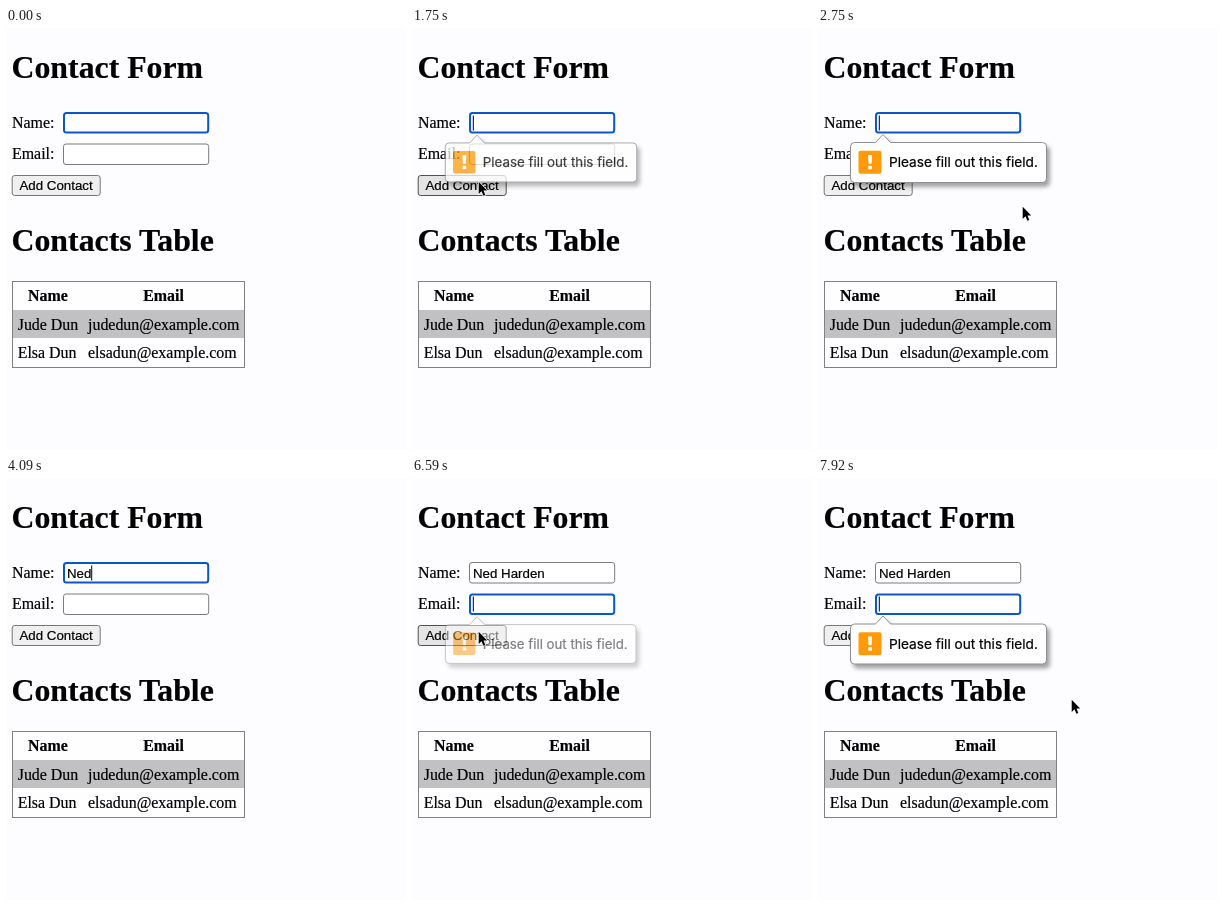
Recreate the animation shown at these times as an HTML page. Size 400 by 422 pixels, loop 8000 ms.

```html
<!DOCTYPE html>
<html lang="en">
<head>
<meta charset="utf-8">
<title>Contact Form</title>
<style>
  html, body { margin: 0; width: 100%; height: 100%; overflow: hidden; background: #fdfcff; }
  svg { display: block; }
  text { font: 15.93px "Liberation Serif", serif; white-space: pre; stroke: #000; stroke-width: .2px; }
  .h1 { font-size: 31.8px; font-weight: bold; }
  .th { font-weight: bold; text-anchor: middle; }
  .ui { font: 13.3px "Liberation Sans", sans-serif; }
  .tip { font: 13.65px Inter, sans-serif; }
  #bubble { filter: drop-shadow(3px 4px 2px rgba(0, 0, 0, .36)); }
</style>
</head>
<body>
<svg width="400" height="422" viewBox="0 0 400 422">
  <rect width="400" height="422" fill="#fdfcff"/>
  <text class="h1" x="5.5" y="50">Contact Form</text>
  <text x="6" y="99.8">Name:</text>
  <text x="6" y="131">Email:</text>
  <rect id="nameBox" rx="2.5" fill="#fff"/>
  <rect id="emailBox" rx="2.5" fill="#fff"/>
  <text id="typed" class="ui" x="61" y="99.5"></text>
  <rect id="caret" width="1" height="15"/>
  <rect id="button" x="6.2" y="147.5" width="88" height="20" rx="2.5"/>
  <text class="ui" x="13.5" y="162">Add Contact</text>

  <text class="h1" x="5.5" y="223">Contacts Table</text>
  <rect x="6.5" y="253.5" width="232" height="86" fill="#fefdff" stroke="#808080"/>
  <rect x="7" y="282" width="231" height="28" fill="#c1c0c3"/>
  <text class="th" x="42" y="273">Name</text>
  <text class="th" x="157.5" y="273">Email</text>
  <text x="11.7" y="301.5">Jude Dun</text>
  <text x="82" y="301.5">judedun@example.com</text>
  <text x="11.7" y="330">Elsa Dun</text>
  <text x="82" y="330">elsadun@example.com</text>

  <g id="bubble">
    <path d="M36.500 114.500H57.500L65 106.500L72.500 114.500H224.500a4 4 0 0 1 4 4V150.500a4 4 0 0 1-4 4H36.500a4 4 0 0 1-4-4V118.500a4 4 0 0 1 4-4Z" fill="#fff" stroke="#8e8e90"/>
    <rect x="40.500" y="122.700" width="23" height="23" rx="2" fill="#ff9a0a"/>
    <path d="M50.100 127h4l-.5 8.700h-3ZM50.300 137.800h3.600v3.400h-3.600Z" fill="#fff"/>
    <text class="tip" x="71" y="139.200">Please fill out this field.</text>
  </g>

  <path id="arrow" d="M.7 .7V12.900L3.500 10.300L5.400 14.700L7.300 13.900L5.500 9.500H9.200Z" stroke="#fff" stroke-width="1.400" paint-order="stroke"/>
  <g id="beam" fill="none">
    <path d="M-4-7.500Q0-7.500 0-5Q0-7.500 4-7.500M0-5V5M-4 7.500Q0 7.500 0 5Q0 7.500 4 7.500M-2 2.500H2" stroke="#fff" stroke-width="3"/>
    <path d="M-4-7.500Q0-7.500 0-5Q0-7.500 4-7.500M0-5V5M-4 7.500Q0 7.500 0 5Q0 7.500 4 7.500M-2 2.500H2" stroke="#111" stroke-width="1.300"/>
  </g>
</svg>
<script>
  const LOOP = 8000, RATE = 12;
  const el = id => document.getElementById(id);
  const set = (id, attrs) => { for (const k in attrs) el(id).setAttribute(k, attrs[k]); };
  const show = (id, on) => set(id, { visibility: on ? 'visible' : 'hidden' });

  const NAME = 'Ned Harden';
  const keyTicks = [45, 47, 49, 51, 54, 55, 57, 59, 60, 61];

  // pointer paths: [tick, x, y]
  const paths = [
    [[1, 285, 258], [2, 280, 250], [3, 280, 250], [4, 268, 240], [6, 193, 163], [7, 193, 163],
     [10, 118, 157], [13, 66, 153], [28, 66, 153], [30, 110, 161], [33, 204, 178], [44, 204, 178]],
    [[67, 204, 178], [69, 140, 147], [70, 116, 136], [71, 101, 134], [72, 93, 136],
     [74, 68, 153], [79, 66, 153], [81, 140, 184], [84, 253, 221], [96, 253, 221]]
  ];

  function pointerAt(n) {
    const path = paths.find(p => n >= p[0][0] && n <= p[p.length - 1][0]);
    if (!path) return null;
    const i = Math.max(1, path.findIndex(p => p[0] >= n));
    const [t0, x0, y0] = path[i - 1], [t1, x1, y1] = path[i];
    const f = (n - t0) / (t1 - t0);
    return { x: x0 + (x1 - x0) * f, y: y0 + (y1 - y0) * f };
  }

  const inside = (p, x, y, w, h) => !!p && p.x >= x && p.x <= x + w && p.y >= y && p.y <= y + h;

  function drawInput(id, y, focused, hover) {
    const d = focused ? 1 : .5;
    set(id, {
      x: 57 + d, y: y + d, width: 146.2 - 2 * d, height: 21.5 - 2 * d,
      stroke: focused ? '#0a58c6' : hover ? '#4a4a4a' : '#7b7b7b',
      'stroke-width': focused ? 2 : 1
    });
  }

  function drawBubble(n) {
    const second = n >= 78, start = second ? 78 : 19;
    const on = second || (n >= 19 && n < 47);
    show('bubble', on);
    if (!on) return;
    const age = n - start;
    const scale = 1 - .032 * Math.max(0, 1 - age / 9) ** 1.3;
    const fade = !second && n >= 45 ? (n === 45 ? .6 : .25) : 1;
    set('bubble', {
      opacity: Math.min(1, (age + 1) / 4) * fade,
      transform: `translate(65 ${second ? 165.5 : 134}) scale(${scale}) translate(-65 -134)`
    });
  }

  function draw(ms) {
    const n = Math.floor(ms * RATE / 1000 + 1e-6);
    const p = pointerAt(n);
    const pressed = (n >= 16 && n < 19) || (n >= 75 && n < 78);
    const inEmail = n >= 78, inName = !inEmail && !pressed;
    const overEmail = inside(p, 57, 116, 146, 21);
    const overName = inside(p, 57, 84, 146, 21);
    const overButton = inside(p, 6, 147, 89, 21);

    drawInput('nameBox', 84, inName, overName);
    drawInput('emailBox', 115.5, inEmail, overEmail);
    set('button', {
      fill: pressed ? '#f5f5f5' : overButton ? '#e4e4e5' : '#efeff0',
      stroke: pressed ? '#8d8d8d' : overButton ? '#4f4f4f' : '#767676'
    });

    const typed = NAME.slice(0, keyTicks.filter(k => k <= n).length);
    el('typed').textContent = typed;

    // the caret restarts its blink on focus and on each key
    const wake = [4, 19, 78, ...keyTicks].filter(k => k <= n);
    const since = wake.length ? n - Math.max(...wake) : 6;
    show('caret', !pressed && since % 12 < 6);
    set('caret', {
      x: 60.8 + (typed && !inEmail ? el('typed').getComputedTextLength() : 0),
      y: inEmail ? 118.5 : 87.5
    });

    drawBubble(n);
    show('arrow', p && !overEmail && !overName);
    show('beam', p && (overEmail || overName));
    if (p) for (const id of ['arrow', 'beam']) set(id, { transform: `translate(${p.x} ${p.y})` });
  }

  const begin = performance.now();
  function tick() {
    draw((performance.now() - begin) % LOOP);
    requestAnimationFrame(tick);
  }
  tick();
</script>
</body>
</html>
```
